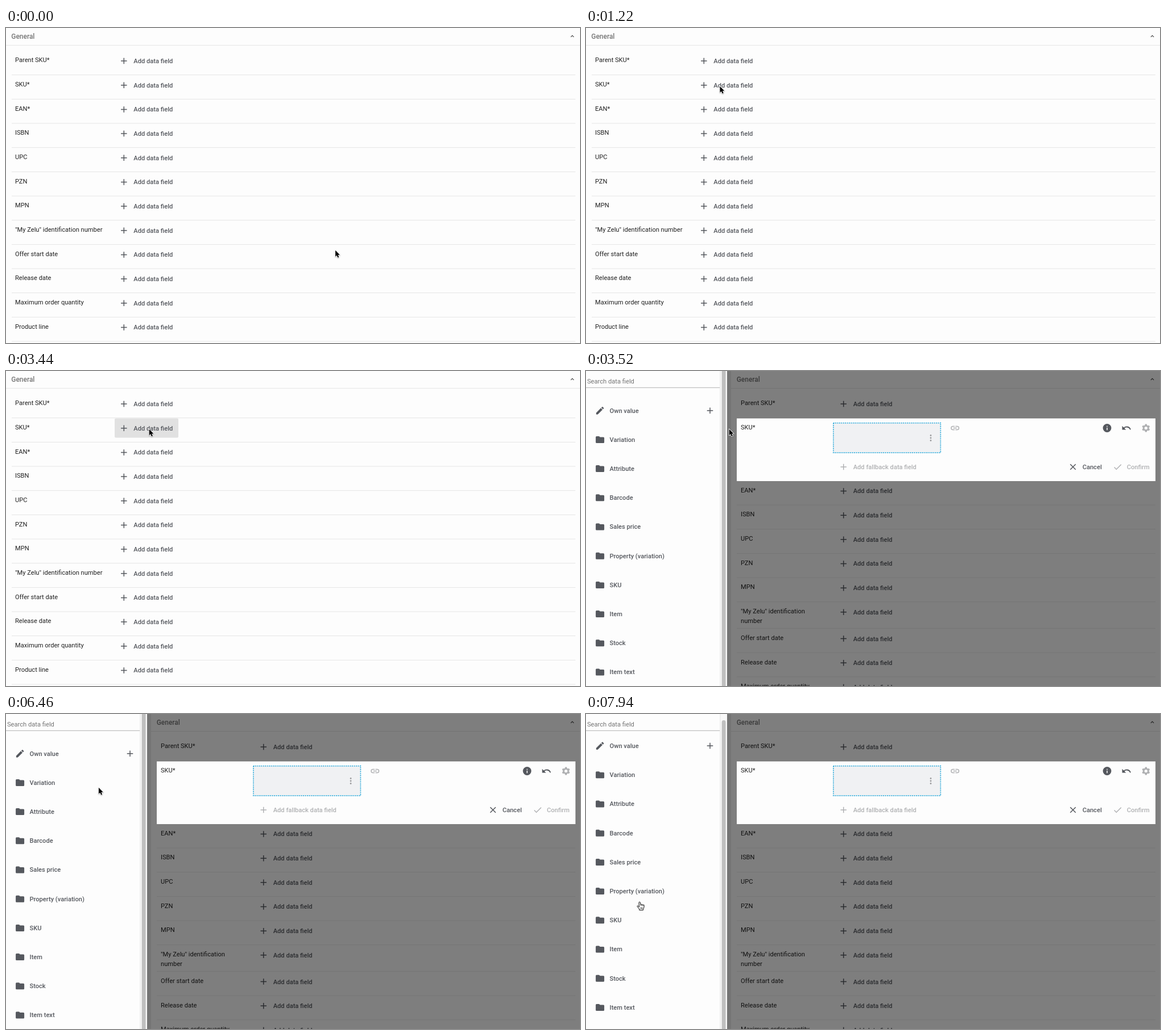
Recreate the animation shown at these times as an HTML page with a canvas. Size 1009 px wide and 555 px high, loop 8000 ms.

```html
<!DOCTYPE html>
<html lang="en">
<head>
<meta charset="utf-8">
<title>Data field mapping</title>
<style>
html, body { margin: 0; width: 100%; height: 100%; overflow: hidden; background: #fdfdfd; }
canvas { display: block; width: 1009px; height: 555px; }
</style>
</head>
<body>
<canvas id="stage"></canvas>
<script>
const W = 1009, H = 555, LOOP = 8000;
const ROW = 42.667, ITEM = 51.2, FIRST_ROW = 39.8;
const INK = '#202020', GREY = '#55585e', MUTED = '#757575', OFF = '#b0b1b3', PAPER = '#fdfdfd';

const canvas = document.getElementById('stage');
const ctx = canvas.getContext('2d');
const dpr = window.devicePixelRatio || 1;
canvas.width = Math.round(W * dpr);
canvas.height = Math.round(H * dpr);

const fields = ['Parent SKU*', 'SKU*', 'EAN*', 'ISBN', 'UPC', 'PZN', 'MPN',
  '"My Zelu" identification number', 'Offer start date', 'Release date',
  'Maximum order quantity', 'Product line'];
const folders = ['Variation', 'Attribute', 'Barcode', 'Sales price',
  'Property (variation)', 'SKU', 'Item', 'Stock', 'Item text'];

// Icons on a 24 unit grid
const icons = {
  add: 'M19 13h-6v6h-2v-6H5v-2h6V5h2v6h6z',
  close: 'M19 6.4L17.6 5 12 10.6 6.4 5 5 6.4l5.6 5.6L5 17.6 6.4 19l5.6-5.6 5.6 5.6 1.4-1.4-5.6-5.6z',
  check: 'M9 16.2L4.8 12l-1.4 1.4L9 19 21 7l-1.4-1.4z',
  up: 'M12 8l-6 6 1.4 1.4 4.6-4.6 4.6 4.6L18 14z',
  folder: 'M10 4H4a2 2 0 0 0-2 2v12a2 2 0 0 0 2 2h16a2 2 0 0 0 2-2V8a2 2 0 0 0-2-2h-8z',
  pencil: 'M3 17.25V21h3.75L17.8 9.95l-3.75-3.75zM20.7 7.05a1 1 0 0 0 0-1.4l-2.35-2.35a1 1 0 0 0-1.4 0l-1.85 1.85 3.75 3.75z',
  link: 'M3.9 12A3.1 3.1 0 0 1 7 8.9h4V7H7a5 5 0 0 0 0 10h4v-1.9H7A3.1 3.1 0 0 1 3.9 12zM8 13h8v-2H8zM17 7h-4v1.9h4a3.1 3.1 0 0 1 0 6.2h-4V17h4a5 5 0 0 0 0-10z',
  undo: 'M12.5 8c-2.65 0-5.05 1-6.9 2.6L2 7v9h9l-3.6-3.6a8 8 0 0 1 12.7 3.6l2.4-.8A10.5 10.5 0 0 0 12.5 8z'
};
for (const name in icons) icons[name] = new Path2D(icons[name]);

const arrowShape = new Path2D('M1 1.8V12.7L3.5 10.4 5.2 14.5 7.2 13.7 5.5 9.7H8.8Z');
const handShape = new Path2D('M4.2 10.2L2.3 8.2C1.2 7.2 .2 8.4 1 9.4L4.4 13.4V15.4H11.2V13.6C12.4 11.8 12.9 10 12.9 7.2C12.9 5.8 11.3 5.8 11.1 6.8C11 5.2 9.3 5.2 9 6.3C8.7 4.9 7 4.9 6.8 6L6 2C5.6 .5 3.4 .8 3.7 2.5Z');

function box(x, y, w, h, color) {
  ctx.fillStyle = color;
  ctx.fillRect(x, y, w, h);
}

function rounded(x, y, w, h, r, color) {
  ctx.fillStyle = color;
  ctx.beginPath();
  ctx.roundRect(x, y, w, h, r);
  ctx.fill();
}

function disc(x, y, r, color) {
  ctx.fillStyle = color;
  ctx.beginPath();
  ctx.arc(x, y, r, 0, Math.PI * 2);
  ctx.fill();
}

// y is the middle of the capitals
function text(str, x, y, color, weight = 400, size = 11.1) {
  ctx.font = `${weight} ${size}px Roboto, sans-serif`;
  ctx.fillStyle = color;
  ctx.fillText(str, x, y + size * 0.355);
}

function icon(name, x, y, color, scale = 0.75) {
  ctx.save();
  ctx.translate(x, y);
  ctx.scale(scale, scale);
  ctx.translate(-12, -12);
  ctx.fillStyle = color;
  ctx.fill(icons[name]);
  ctx.restore();
}

function gear(x, y, color) {
  ctx.fillStyle = color;
  ctx.beginPath();
  for (let i = 0; i < 6; i++) {
    const a = i * Math.PI / 3 + Math.PI / 6;
    [[-0.38, 5.4], [-0.2, 7.2], [0.2, 7.2], [0.38, 5.4]].forEach(([d, r]) =>
      ctx.lineTo(x + r * Math.cos(a + d), y + r * Math.sin(a + d)));
  }
  ctx.closePath();
  ctx.fill();
  disc(x, y, 2.6, PAPER);
}

function addButton(x, y) {
  icon('add', x, y, GREY);
  text('Add data field', x + 17, y, GREY, 500);
}

function header(x) {
  text('General', x, 14.3, MUTED, 500, 11.95);
  icon('up', 995.5, 14.6, '#333', 0.5);
}

function drawList(press) {
  header(9.3);
  box(0, 30, W, 0.85, '#e2e2e2');
  if (press) rounded(191, 83.5, 112, 34, 2, `rgba(0,0,0,${press})`);
  fields.forEach((name, i) => {
    const y = FIRST_ROW + i * ROW;
    text(name, 16, y + 16.7, INK);
    addButton(207.3, y + 18.3);
    box(10, y + ROW - 0.2, 991, 0.85, '#e2e2e2');
  });
}

function drawDimmedList() {
  box(248, 0, 7, H, '#ebebeb');
  header(264.7);
  box(255, 30, W - 255, 0.85, '#e2e2e2');
  let y = FIRST_ROW;
  fields.forEach((name, i) => {
    const cut = name.indexOf(' number');
    if (cut > 0) {
      text(name.slice(0, cut), 272, y + 16.7, INK);
      text(name.slice(cut + 1), 272, y + 33.3, INK);
    } else {
      text(name, 272, y + 16.7, INK);
    }
    addButton(452.7, y + 18.3);
    y += i === 1 ? 110.7 : cut > 0 ? 46.8 : ROW;
    box(265, y - 0.2, 736, 0.85, '#e8e8e8');
  });
  box(248, 0, W - 248, H, 'rgba(0,0,0,.5)');
}

function drawEditor() {
  box(265, 83.5, 736, 110.5, PAPER);
  text('SKU*', 272, 99.2, INK);

  box(434, 91, 190, 53.5, '#f0f1f3');
  ctx.strokeStyle = '#1ca7db';
  ctx.lineWidth = 1.7;
  ctx.setLineDash([1.7, 1.7]);
  ctx.strokeRect(434.9, 91.7, 188.4, 52.2);
  ctx.setLineDash([]);
  for (let i = -1; i <= 1; i++) disc(606, 118 + i * 4.5, 1.4, '#9b9c9e');

  icon('link', 648.7, 100.5, OFF);
  disc(916, 100.5, 7.4, GREY);
  box(915.25, 99.8, 1.5, 4.4, PAPER);
  box(915.25, 96.8, 1.5, 1.5, PAPER);
  icon('undo', 950, 100.5, GREY);
  gear(984.3, 100.5, OFF);

  icon('add', 452.7, 169, OFF);
  text('Add fallback data field', 469.7, 169, OFF, 500);
  icon('close', 856, 169, GREY);
  text('Cancel', 872.7, 169, GREY, 500);
  icon('check', 934.5, 169, OFF);
  text('Confirm', 950.8, 169, OFF, 500);
}

function drawSidebar(scroll, hot) {
  box(0, 0, 248, H, PAPER);
  text('Search data field', 2, 18.3, MUTED, 400, 11.15);
  box(0, 28.8, 235.5, 0.9, '#a8a8a8');

  const top = 69.7 - 13.6 * scroll;
  icon('pencil', 24.6, top, GREY);
  text('Own value', 41.5, top, GREY, 500);
  icon('add', 218, top, GREY);
  folders.forEach((name, i) => {
    const y = top + (i + 1) * ITEM;
    icon('folder', 24.6, y, GREY);
    text(name, 41.5, y, GREY, 500);
  });

  box(235.5, 0, 12.5, H, '#f8f8f8');
  box(235.5, 0, 0.9, H, '#e4e4e4');
  rounded(238.7, -4 + 15 * scroll, 6.9, H + 10, 3.4, hot ? '#7f7f7f' : '#bfbfbf');
}

// Each move: start, end, steps, target x, target y, easing
const smooth = p => p * p * (3 - 2 * p);
const linear = p => p;
const moves = [
  [80, 860, 10, 240.5, 109.5, smooth],
  [950, 1220, 4, 234.5, 101, p => p * (2 - p)],
  [2660, 2740, 2, 227.5, 92.5, linear],
  [2830, 2830, 1, 231.5, 101, linear],
  [3000, 3090, 2, 250.7, 100.7, linear],
  [5850, 5850, 1, 249.3, 104.3, linear],
  [5940, 6630, 9, 149.3, 131.5, smooth],
  [6720, 6810, 2, 144.8, 131.5, linear],
  [7070, 7860, 10, 112, 281.5, p => Math.pow(p, 2.5)]
];

function progress(t, t0, t1, n) {
  if (t < t0) return 0;
  if (n === 1 || t >= t1) return 1;
  return (Math.floor((t - t0 + 12) / (t1 - t0) * (n - 1)) + 1) / n;
}

function pointer(t) {
  let x = 578, y = 390;
  for (const [t0, t1, n, tx, ty, ease] of moves) {
    if (t < t0) break;
    const p = ease(Math.min(1, progress(t, t0, t1, n)));
    x += (tx - x) * p;
    y += (ty - y) * p;
  }
  return { x, y };
}

function drawPointer(x, y, hand) {
  ctx.save();
  ctx.translate(x, y);
  ctx.lineJoin = 'round';
  ctx.shadowColor = 'rgba(0,0,0,.35)';
  ctx.shadowBlur = 1.5 * dpr;
  ctx.shadowOffsetY = 0.7 * dpr;
  if (hand) {
    ctx.fillStyle = '#fff';
    ctx.fill(handShape);
    ctx.shadowColor = 'transparent';
    ctx.strokeStyle = '#111';
    ctx.lineWidth = 1;
    ctx.stroke(handShape);
    ctx.lineWidth = 0.8;
    ctx.stroke(new Path2D('M6.8 6L7.1 8.2M9 6.3L9.2 8.3M11.1 6.8V8.5M6.7 10.8V13.4M8.3 10.8V13.4M9.9 10.8V13.4'));
  } else {
    ctx.strokeStyle = '#fff';
    ctx.lineWidth = 1.7;
    ctx.stroke(arrowShape);
    ctx.shadowColor = 'transparent';
    ctx.fillStyle = '#000';
    ctx.fill(arrowShape);
  }
  ctx.restore();
}

function draw(t) {
  ctx.setTransform(dpr, 0, 0, dpr, 0, 0);
  box(0, 0, W, H, PAPER);
  const { x, y } = pointer(t);
  if (t < 3520) {
    drawList(0.11 * progress(t, 3270, 3440, 3));
  } else {
    drawDimmedList();
    drawEditor();
    drawSidebar(progress(t, 7760, 7860, 2), x > 236 && x < 248);
  }
  const hand = t >= 7940;
  drawPointer(hand ? 89.3 : x, hand ? 330 : y, hand);
}

const start = performance.now();
function tick(now) {
  draw(Math.max(0, now - start) % LOOP);
  requestAnimationFrame(tick);
}
draw(0);
requestAnimationFrame(tick);
</script>
</body>
</html>
```
